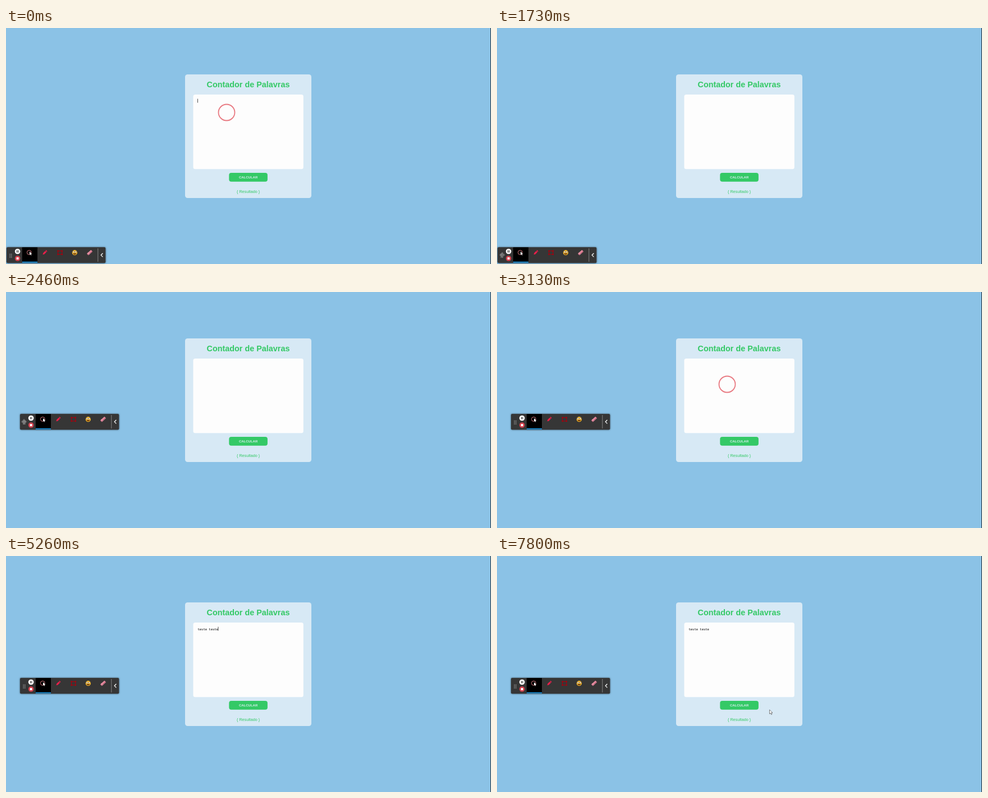
Recreate the animation shown at these times as an HTML page. Size 864 by 422 pixels, loop 8000 ms.

```html
<!DOCTYPE html>
<html lang="pt">
<head>
<meta charset="utf-8">
<title>Contador de Palavras</title>
<style>
  html, body { margin: 0; width: 100%; height: 100%; overflow: hidden; background: #8bc2e6; }
  svg { display: block; width: 864px; height: 422px; }
  text { text-anchor: middle; font-family: "Liberation Sans", Arial, sans-serif; }
  #typed { text-anchor: start; font: 5.5px "DejaVu Sans Mono", monospace; white-space: pre; }
  #bar { filter: drop-shadow(0 0 1.5px #0009); }
  #bar text { font: bold 4.5px Roboto, sans-serif; fill: #fff; }
</style>
</head>
<body>
<svg viewBox="0 0 864 422">
  <rect x="863" width="1" height="422" fill="#23313a"/>
  <rect x="319" y="83" width="225" height="221" rx="4.5" fill="#d7e9f5"/>
  <text x="431.5" y="105.8" font-size="14.4" font-weight="bold" fill="#34c966">Contador de Palavras</text>
  <rect x="333.5" y="119" width="196.3" height="133.3" rx="3.6" fill="#fdfdfd"/>
  <text id="typed" x="341.5" y="132.7"></text>
  <rect id="caret" y="126.6" width=".8" height="7" fill="#222"/>
  <rect x="397.3" y="259" width="68.6" height="15.7" rx="4" fill="#34c966"/>
  <text x="431.6" y="269" font-size="6" font-weight="bold" fill="#d7eef0">CALCULAR</text>
  <text x="431.6" y="295.2" font-size="7.2" fill="#34c966">{ Resultado }</text>

  <g id="bar">
    <rect x="1" y="392" width="176.3" height="28.3" rx="2" fill="#363636"/>
    <path d="M7.1 403.7v7M9.8 403.7v7" stroke="#ccc" stroke-width="1.1" stroke-dasharray="1.1 .9"/>
    <circle cx="20.6" cy="399.5" r="4.8" fill="#fff"/>
    <path d="M19.5 397.4v4.2M21.8 397.4v4.2" stroke="#222" stroke-width="1.1"/>
    <circle cx="20.6" cy="412" r="4.8" fill="#d23f4c"/>
    <rect x="18.7" y="410.1" width="3.8" height="3.8" rx=".5" fill="#fff"/>
    <rect x="28.8" y="392" width="27.2" height="27" fill="#000"/>
    <rect x="28.8" y="417.8" width="27.2" height="1.7" fill="#1a9ff0"/>
    <circle cx="41.3" cy="401.4" r="3.9" fill="none" stroke="#e8868c" stroke-width=".9"/>
    <path d="M42 399.8v6l1.4-1.2 1 2 1-.5-1-2h1.8z" fill="#fff"/>
    <g transform="translate(69 401.7) rotate(45)">
      <path d="M-1.5-5h3v1.6h-3zM-1.5-2.8h3v5.2L0 5l-1.5-2.6z" fill="#ea1f4a"/>
    </g>
    <g fill="none" stroke="#a8000d">
      <rect x="92.6" y="398.6" width="7.2" height="6.2"/>
      <path d="M91.4 398.6h2.4m4.8 0h2.4m-9.6 6.2h2.4m4.8 0h2.4" stroke-width="2.2"/>
    </g>
    <circle cx="122.4" cy="401.7" r="4.6" fill="#f6bd2b"/>
    <path d="M119.2 403h6.4q-.8 2.3-3.2 2.3t-3.2-2.3" fill="#6b3412"/>
    <g fill="#fff" stroke="#70451b" stroke-width=".6">
      <circle cx="120.5" cy="400.5" r="1.4"/><circle cx="124.3" cy="400.5" r="1.4"/>
    </g>
    <g transform="translate(149 401.5) rotate(-42)">
      <rect x="-5" y="-2" width="10" height="4.2" rx=".7" fill="#e68a9e"/>
      <path d="M-5 1.2H5" stroke="#b65c75"/>
      <path d="M-2.3-2v4.2" stroke="#f7c6d0" stroke-width=".6"/>
    </g>
    <path d="M163.8 394v24" stroke="#aaa" stroke-width=".7"/>
    <path d="M172.4 402.8l-3.2 3.3 3.2 3.3" fill="none" stroke="#fff" stroke-width="1.3"/>
  </g>

  <circle id="ring" r="14.5" fill="none" stroke="#e87880" stroke-width="1.8"/>
  <path id="arrow" d="M0 0v7.4l1.8-1.6 1.3 2.8 1.3-.6-1.3-2.7h2.4z" fill="#fff" stroke="#333" stroke-width=".6"/>
  <path id="move" d="M0-4.5l1.6 1.8H.5v2.2h2.2v-1.1L4.5 0 2.7 1.6V.5H.5v2.2h1.1L0 4.5l-1.6-1.8h1.1V.5h-2.2v1.1L-4.5 0l1.8-1.6v1.1h2.2v-2.2h-1.1z"
        fill="#222" stroke="#ddd" stroke-width=".5"/>
</svg>
<script>
const LOOP = 8000, FPS = 15, BLINK = 533;
const $ = id => document.getElementById(id);
const ease = u => u * u * (3 - 2 * u);
const linear = u => u;

// Position along [time, x, y] stops
function along(stops, t, curve) {
  const i = stops.findIndex(s => s[0] > t);
  if (i < 0) return stops[stops.length - 1].slice(1);
  if (!i) return stops[0].slice(1);
  const [t0, x0, y0] = stops[i - 1], [t1, x1, y1] = stops[i];
  const u = curve((t - t0) / (t1 - t0));
  return [x0 + (x1 - x0) * u, y0 + (y1 - y0) * u];
}

const drag = [[1760, 0, 0], [2200, 17, -92], [2400, 24, -174]];
const toBar = [[60, 393, 151], [1330, 9.3, 408]];
const toCard = [[2460, 32, 232], [3130, 410, 165]];
const toButton = [[7130, 410, 165], [7470, 666, 397], [7790, 485.5, 275]];

function mouseAt(t) {
  if (t < 1340) return along(toBar, t, ease);
  if (t < 2460) {
    const [dx, dy] = along(drag, t + 35, linear);
    return [9 + dx, 407.5 + dy];
  }
  return along(t < 7000 ? toCard : toButton, t, ease);
}

function typedCount(t) {
  if (t < 4000) return 0;
  return t < 5130 ? Math.min(10, Math.floor((t - 4000) / 75)) : 11;
}

function place(el, x, y, opacity) {
  el.setAttribute("transform", `translate(${x} ${y})`);
  el.setAttribute("opacity", opacity);
}

function draw(t) {
  const [bx, by] = along(drag, t, linear);
  place($("bar"), bx, by, 1);

  const [x, y] = mouseAt(t);
  const onText = x > 333 && x < 530 && y > 119 && y < 252;
  const onHandle = Math.hypot(x - bx - 8.5, y - by - 407) < 20 && x < bx + 16;
  place($("arrow"), x, y, +(!onText && !onHandle));
  place($("move"), x, y, +onHandle);

  const ringFade = t < 1000 ? 1 - (t - 60) / 200 : t > 3130 ? 1 - (t - 3200) / 130 : 0;
  place($("ring"), x, y, Math.max(0, Math.min(1, ringFade)));

  const count = typedCount(t);
  $("typed").textContent = "teste teste".slice(0, count);
  const lastKey = count > 10 ? 5130 : count ? 4000 + 75 * count : t < 3200 ? 0 : 3200;
  const focused = t < 1590 || t >= 3200;
  place($("caret"), 341.2 + 3.31 * count, 0, +(focused && (t - lastKey) % (2 * BLINK) < BLINK));
}

function tick() {
  const t = performance.now() % LOOP;
  draw(Math.floor((t + 10) * FPS / 1000) * 1000 / FPS % LOOP);
  requestAnimationFrame(tick);
}
tick();
</script>
</body>
</html>
```
